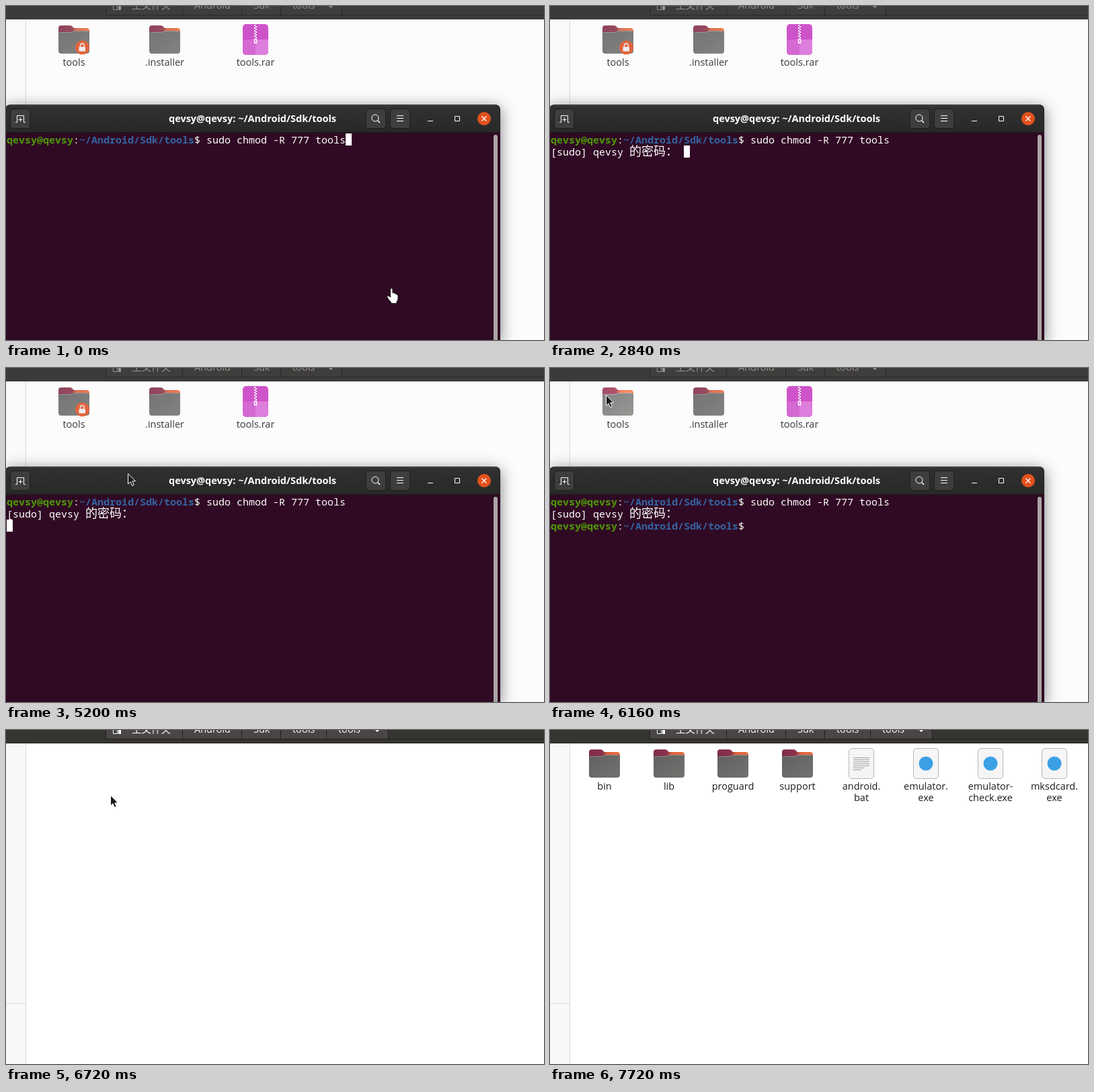
Recreate the animation shown at these times as an HTML page. Size 800 by 498 pixels, loop 8.12 s.

```html
<!DOCTYPE html>
<html lang="zh">
<head>
<meta charset="utf-8">
<title>Terminal and file manager</title>
<style>
  html, body { margin: 0; width: 100%; height: 100%; overflow: hidden; background: #fcfcfc; }
  svg { display: block; width: 100vw; height: 100vh; }
  text { font: 14.5px "Open Sans", "Noto Sans", "Noto Sans CJK SC", sans-serif; }
  .label { fill: #1c1c1c; text-anchor: middle; }
  .mono { font: 15px "Noto Sans Mono", "DejaVu Sans Mono", monospace; fill: #fff; }
  .mono tspan { font-weight: 700; }
  .user { fill: #4e9a06; }
  .path { fill: #3465a4; }
  .cjk { font: 18px "Noto Sans CJK SC", "Noto Sans CJK", sans-serif; fill: #fff; }
  .title { font-weight: 700; font-size: 14.5px; fill: #fff; text-anchor: middle; }
  .line { fill: none; stroke: #fff; }
  .button { fill: #403e3d; stroke: #1f1e1e; }
  .shadow { filter: drop-shadow(0 4px 11px rgba(0, 0, 0, .5)); }
</style>
</head>
<body>
<svg viewBox="0 0 800 498">
  <defs>
    <linearGradient id="tab">
      <stop offset="0" stop-color="#7b2c4c"/><stop offset=".45" stop-color="#8e3348"/>
      <stop offset=".6" stop-color="#d5502f"/><stop offset="1" stop-color="#e8602c"/>
    </linearGradient>
    <linearGradient id="front" x2="1" y2="1">
      <stop offset="0" stop-color="#616161"/><stop offset="1" stop-color="#727270"/>
    </linearGradient>
    <linearGradient id="bar" x2="0" y2="1">
      <stop offset="0" stop-color="#323131"/><stop offset="1" stop-color="#292828"/>
    </linearGradient>
    <clipPath id="archive"><rect x="-19" y="27" width="38" height="46" rx="5"/></clipPath>
    <g id="folder">
      <path fill="url(#tab)" d="M-19 29H-6Q-3 29-2 31L0 33H19Q23 33 23 37V50H-23V33Q-23 29-19 29Z"/>
      <path stroke="#f3a06e" stroke-dasharray="1 1" d="M1 35.5H22"/>
      <path fill="url(#front)" d="M-23 42Q-23 39-20 39H-6Q-4 39-2 38L-1 37H20Q23 37 23 40V67Q23 71 19 71H-19Q-23 71-23 67Z"/>
      <path fill="none" stroke="#fff" stroke-opacity=".25" d="M-22 39.5H-6Q-4 39.5-2 38.5L-1 37.5H21"/>
    </g>
    <g id="sheet">
      <rect x="-18.5" y="27.5" width="37" height="45" rx="4.5" fill="#f5f5f5" stroke="#b6b6b6"/>
    </g>
    <g id="script">
      <use href="#sheet"/>
      <path fill="none" stroke="#999" d="M-12 41.5H12M-12 44.5H12M-12 47.5H12M-12 50.5H12M-12 53.5H12M-12 56.5H5M-12 59.5H0"/>
    </g>
    <g id="program"><use href="#sheet"/><circle cy="50" r="10.5" fill="#3ba0e6"/></g>
    <g id="rar" clip-path="url(#archive)">
      <path fill="#c83cc3" d="M-19 27H19V73H-19Z"/>
      <path fill="#cf55cd" d="M-19 50H0V73H-19Z"/>
      <path fill="#d96dd8" d="M0 50H19V73H0Z"/>
      <path stroke="#fff" stroke-width="2" stroke-dasharray="2 2" d="M-1 28V48M1 30V48"/>
      <path fill="none" stroke="#fff" stroke-width="1.4" d="M-1.5 49.5H1.5V55H-1.5Z"/>
    </g>
  </defs>

  <rect id="sidebar" width="30" height="498"/>
  <rect id="content" x="30" width="770" height="498"/>
  <path fill="none" stroke="#d9d9d9" d="M29.5 20V498M0 407.5H29"/>
  <g id="outer"></g>
  <g id="lock">
    <circle cx="113.5" cy="62" r="10.5" fill="#ef6237"/>
    <rect x="108.5" y="61" width="9.5" height="6.5" rx="1" fill="#fff"/>
    <path class="line" stroke-width="1.5" d="M110.5 61V58.5A2.7 2.7 0 0 1 116 58.5V61"/>
  </g>
  <g id="inner"></g>
  <g id="idleHeader"></g>
  <g id="activeHeader"></g>
  <g id="deepHeader"></g>

  <g id="terminal">
    <path class="shadow" fill="#252424" d="M-1 500V155Q-1 147 7 147H727Q735 147 735 155V500Z"/>
    <path fill="url(#bar)" d="M0 188V155Q0 148 7 148H727Q734 148 734 155V188Z"/>
    <path fill="#300a24" d="M0 189H735V498H0Z"/>
    <path stroke="#1b1a1a" d="M0 188.5H735"/>
    <path class="line" stroke-opacity=".12" d="M6 148.5H728"/>
    <rect x="725" y="192" width="6" height="320" rx="3" fill="#aaa5a6"/>
    <g class="button">
      <rect x="6.500" y="153.500" width="29" height="29" rx="4"/>
      <rect x="535.500" y="153.500" width="29" height="29" rx="4"/>
      <rect x="571.500" y="153.500" width="29" height="29" rx="4"/>
    </g>
    <g class="line">
      <path d="M14 173.500H16.500V163.500H26.500V173.500H29M18.500 169.500H24.500M21.500 166.500V172.500"/>
      <circle cx="549" cy="167" r="5"/>
      <path stroke-width="1.500" d="M552.700 170.700L556 174"/>
      <path d="M581 163.500H591M581 167.500H591M581 171.500H591M627 171.500H635M667.500 164.500H674.500V171.500H667.500Z"/>
    </g>
    <circle cx="711" cy="168" r="10" fill="#e2511c"/>
    <path class="line" stroke-width="1.400" d="M707.500 164.500L714.500 171.500M714.500 164.500L707.500 171.500"/>
    <text class="title" x="366.500" y="173">qevsy@qevsy: ~/Android/Sdk/tools</text>
    <g id="command"></g>
    <g id="password">
      <text class="mono" x="1" y="223">[sudo] qevsy</text>
      <text class="cjk" x="118" y="223">的密码：</text>
    </g>
    <g id="prompt"></g>
    <rect id="caret" width="9" height="18" fill="#fff"/>
  </g>

  <g id="pointer">
    <path id="hand" fill="#fff" stroke="#111" d="M5.500 14V3Q5.500 .8 7.200 .8Q9 .8 9 3V8Q9.500 7 10.800 7.200Q12 7.500 12 9Q14.500 8 15 10.200Q17 10 17 12V16Q17 19 15 21V23.500H6.500V21.500Q3.500 19 1 14.500Q0 12.500 1.500 12Q3 11.700 5.500 14Z"/>
    <g id="ibeam" fill="none">
      <path stroke="#fff" stroke-width="3" d="M0 1.500H7M0 15.500H7M3.500 1V16"/>
      <path stroke="#111" d="M1 1.500H6M1 15.500H6M3.500 1V16"/>
    </g>
    <path id="arrow" fill="#1b1b1b" stroke="#fff" d="M.5 .5V16L4 12.800L6.500 18.500L9.300 17.300L6.800 11.700H11.500Z"/>
  </g>
</svg>
<script>
const LOOP = 8120;
const el = id => document.getElementById(id);
const show = (id, on) => { el(id).style.display = on ? "" : "none"; };

const file = (icon, x, ...lines) =>
  `<use id="${icon}${x}" href="#${icon}" x="${x}"/>` +
  lines.map((s, i) => `<text class="label" x="${x}" y="${89 + 17 * i}">${s}</text>`).join("");

function header(depth, active) {
  const edges = [149, 263, 351, 409, 477].slice(0, depth);
  const end = depth === 5 ? 568 : 499;
  const ink = active ? "#fff" : "#949392";
  const edge = active ? "#211f1e" : "#2b2928";
  const names = ["主文件夹", "Android", "Sdk", "tools", "tools"].slice(0, depth);
  const starts = [187, 280, 368, 426, 494];
  const arrow = end - 16;
  return `<rect width="800" height="20" fill="${active ? "#373532" : "#3d3b39"}"/>
    <rect x="149" width="${end - 149}" height="13" fill="${active ? "#494645" : "#403e3c"}"/>
    <path fill="none" stroke="${edge}" d="M149 13.5H800M${end}.5 0V13${edges.map(x => `M${x - .5} 0V13`).join("")}"/>
    <path stroke="${active ? "#22201f" : "#383634"}" d="M0 19.5H800"/>
    <path fill="none" stroke="${ink}" d="M159.5 0V5.500H165.500V0"/>
    <path fill="${ink}" d="M167 0H171V6H167ZM${arrow - 4} -1H${arrow + 4}L${arrow} 3Z"/>` +
    names.map((s, i) => `<text x="${starts[i]}" y="4" fill="${ink}">${s}</text>`).join("");
}

const prompt = (y, command) =>
  `<text class="mono" x="1" y="${y}"><tspan class="user">qevsy@qevsy</tspan>:` +
  `<tspan class="path">~/Android/Sdk/tools</tspan>$ ${command}</text>`;

el("outer").innerHTML = file("folder", 101, "tools") + file("folder", 236, ".installer") + file("rar", 371, "tools.rar");
el("inner").innerHTML = [
  ["folder", "bin"], ["folder", "lib"], ["folder", "proguard"], ["folder", "support"],
  ["script", "android.", "bat"], ["program", "emulator.", "exe"],
  ["program", "emulator-", "check.exe"], ["program", "mksdcard.", "exe"]
].map(([icon, ...lines], i) => file(icon, Math.round(81 + 95.6 * i), ...lines)).join("");
el("idleHeader").innerHTML = header(4, false);
el("activeHeader").innerHTML = header(4, true);
el("deepHeader").innerHTML = header(5, true);
el("command").innerHTML = prompt(205, "sudo chmod -R 777 tools");
el("prompt").innerHTML = prompt(241, "");

// Pointer glides: first step time, last step time, steps, end x, end y
const glides = [
  [0, 0, 1, 566, 420], [80, 200, 3, 486, 341], [520, 680, 3, 635, 250],
  [920, 920, 1, 636, 241], [1280, 1360, 2, 639, 246],
  [3000, 3000, 1, 613, 252], [3080, 3400, 5, 118, 105],
  [3560, 3560, 1, 4, 160], [3640, 3640, 1, 181, 157], [5640, 5640, 1, 135, 157],
  [5800, 6040, 4, 68, 62], [6120, 6160, 2, 83, 40], [6720, 6720, 1, 155, 97],
  [6800, 7200, 6, 480, 306], [7280, 7720, 7, 785, 500]
];
const moves = [];
let from = [566, 420];
for (const [start, end, steps, x, y] of glides) {
  for (let i = 0; i < steps; i++) {
    const time = steps > 1 ? start + (end - start) * i / (steps - 1) : start;
    const k = (i + 1) / steps;
    moves.push([Math.round(time / 40) * 40, Math.round(from[0] + (x - from[0]) * k), Math.round(from[1] + (y - from[1]) * k)]);
  }
  from = [x, y];
}

// Caret cells: start time, x, y; no place means hidden
const carets = [[0, 505, 190], [2840, 199, 208], [3560], [4160, 199, 208], [5200, 1, 226], [5240, 298, 226], [5960]];
const latest = (list, t) => list.findLast(step => step[0] <= t);

function render(t) {
  const opened = t >= 6640;
  const focus = Math.min(1, Math.max(0, (t - 6440) / 200));
  show("terminal", t < 6440);
  show("password", t >= 2840);
  show("prompt", t >= 5240);
  show("lock", t < 5320);
  show("outer", !opened);
  show("inner", t >= 6800);
  show("deepHeader", opened);
  el("activeHeader").style.opacity = focus;
  el("outer").style.opacity = el("lock").style.opacity = .88 + .12 * focus;
  el("content").style.fill = focus < 1 ? "#fcfcfc" : "#fff";
  el("sidebar").style.fill = focus < 1 ? "#fafafa" : "#f8f8f8";
  el("folder101").style.filter = t >= 6040 ? "brightness(1.2)" : "none";

  const [, cx, cy] = latest(carets, t);
  show("caret", cx !== undefined);
  if (cx !== undefined) el("caret").setAttribute("transform", `translate(${cx} ${cy})`);

  const [, x, y] = latest(moves, t);
  const kind = t < 920 ? "hand" : t < 6440 && y > 180 ? "ibeam" : "arrow";
  for (const name of ["hand", "ibeam", "arrow"]) show(name, name === kind);
  show("pointer", t < 2840 || t >= 3000);
  el("pointer").setAttribute("transform", `translate(${x} ${y})`);
}

const begin = performance.now();
function tick() {
  render((performance.now() - begin) % LOOP);
  requestAnimationFrame(tick);
}
tick();
</script>
</body>
</html>
```
